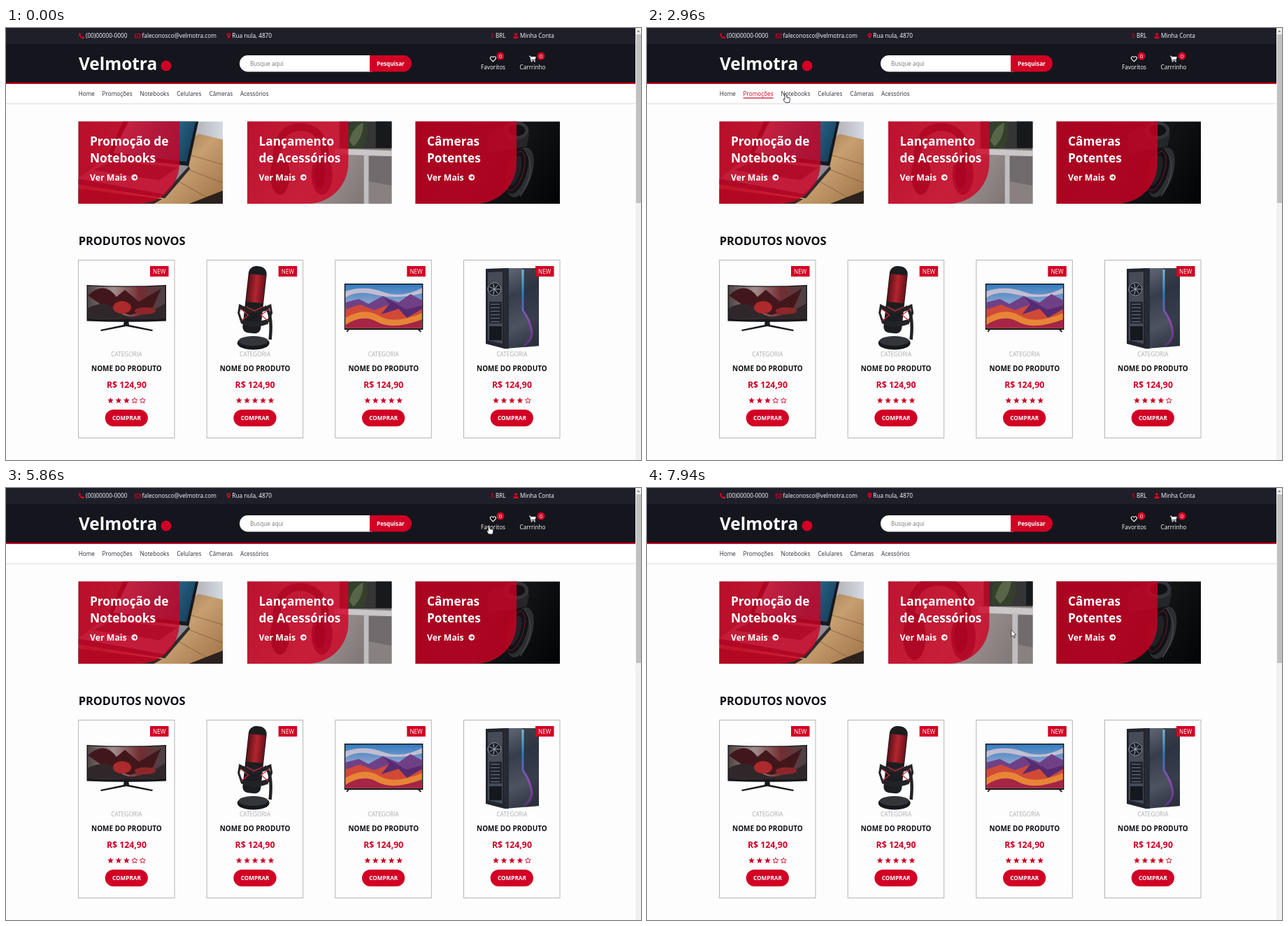
Recreate the animation shown at these times as an HTML page with a canvas. Size 908 by 617 pixels, loop 8000 ms.

```html
<!DOCTYPE html>
<html lang="pt-BR">
<head>
<meta charset="utf-8">
<title>Velmotra</title>
<style>
  html, body { margin: 0; width: 100%; height: 100%; overflow: hidden; background: #fff; }
  canvas { display: block; width: 908px; height: 617px; }
</style>
</head>
<body>
<canvas id="stage" width="908" height="617"></canvas>
<script>
const LOOP = 8000;
const RED = '#d10024', INK = '#2b2d3a';
const ctx = document.getElementById('stage').getContext('2d');

// ---------- timing helpers ----------
const clamp = v => Math.max(0, Math.min(1, v));
const ease = v => { v = clamp(v); return v * v * (3 - 2 * v); };
const hover = (t, [start, end], ms) => ease((t - start) / ms) * (1 - ease((t - end) / ms));

function mix(a, b, k) {
  return `rgb(${a.map((v, i) => Math.round(v + (b[i] - v) * k)).join()})`;
}

// ---------- drawing helpers ----------
function box(x, y, w, h, fill) {
  ctx.fillStyle = fill;
  ctx.fillRect(x, y, w, h);
}

function pill(x, y, w, h, r, fill) {
  ctx.beginPath();
  ctx.roundRect(x, y, w, h, r);
  ctx.fillStyle = fill;
  ctx.fill();
}

function disc(x, y, r, fill) {
  ctx.beginPath();
  ctx.arc(x, y, r, 0, 7);
  ctx.fillStyle = fill;
  ctx.fill();
}

function oval(x, y, rx, ry, fill) {
  ctx.beginPath();
  ctx.ellipse(x, y, rx, ry, 0, 0, 7);
  ctx.fillStyle = fill;
  ctx.fill();
}

function shape(d, fill, stroke, width = 1) {
  const p = new Path2D(d);
  if (fill) { ctx.fillStyle = fill; ctx.fill(p); }
  if (stroke) { ctx.strokeStyle = stroke; ctx.lineWidth = width; ctx.stroke(p); }
}

function at(x, y, s, draw) {
  ctx.save();
  ctx.translate(x, y);
  ctx.scale(s, s);
  draw();
  ctx.restore();
}

function text(str, x, y, size, fill, weight = 400, align = 'left') {
  ctx.font = `${weight} ${size}px "Open Sans", "Noto Sans", sans-serif`;
  ctx.textAlign = align;
  ctx.fillStyle = fill;
  ctx.fillText(str, x, y);
}

function fade(x0, y0, x1, y1, ...colors) {
  const g = ctx.createLinearGradient(x0, y0, x1, y1);
  colors.forEach((c, i) => g.addColorStop(i / (colors.length - 1), c));
  return g;
}

// ---------- header ----------
function topBar() {
  box(0, 0, 900, 23, '#1e1f29');
  at(104, 7.2, .8, () => shape('M1 0H3L4 3 3 4Q4 6 6 7L7 6 10 7V9Q9 10 8 10Q0 9 0 1Z', RED));
  text('(00)00000-0000', 114, 14, 8.25, '#fff');
  shape('M184.5 8.5H192.2V14H184.5ZM184.5 9.8L188.3 12.2 192.2 9.8', null, RED);
  text('faleconosco@velmotra.com', 194.5, 14, 8.25, '#fff');
  at(315.5, 7, .82, () => shape('M3.5 0Q7 0 7 3.5Q7 6 3.5 10Q0 6 0 3.5Q0 0 3.5 0Z', RED));
  disc(318.4, 9.8, 1.1, '#1e1f29');
  text('Rua nula, 4870', 323.3, 14, 8.25, '#fff');
  text('$', 693, 14.2, 8.8, RED);
  text('BRL', 700, 14, 8.2, '#fff');
  disc(729, 9, 2.1, RED);
  shape('M725.5 15V13.4Q725.8 11.6 727.5 11.6H730.5Q732.3 11.6 732.5 13.4V15Z', RED);
  text('Minha Conta', 735, 14, 8.2, '#fff');
}

function action(label, x, k) {
  text(label, x, 59, 8.2, mix([255, 255, 255], [209, 0, 36], k), 400, 'center');
}

function badge(x) {
  disc(x, 40, 5.5, RED);
  text('0', x, 42.9, 8, '#fff', 400, 'center');
}

function header(t) {
  box(0, 23, 900, 55, '#15161d');
  box(0, 78, 900, 2, RED);
  text('Velmotra', 104, 60, 24.4, '#fff', 700);
  disc(229, 54, 7.5, RED);

  pill(334, 39, 190, 23.5, [11.7, 0, 0, 11.7], '#fff');
  pill(520, 39, 60, 23.5, [0, 11.7, 11.7, 0], RED);
  text('Busque aqui', 349, 54, 8.2, '#757575');
  text('Pesquisar', 530, 54, 8.2, '#fff', 700);

  at(692, 40, .88, () => shape('M5 9 1 5C-1 2 3-1 5 2C7-1 11 2 9 5Z', null, '#fff', 1.2));
  at(748, 39.8, .97, () => {
    shape('M0 0H2L2.4 1.3H10L9 5.4H3.2L3.4 6.2H9V7.1H2.6L1.3 1H0Z', '#fff');
    disc(3.7, 8.3, .9, '#fff');
    disc(8.2, 8.3, .9, '#fff');
  });
  badge(707);
  badge(765);
  action('Favoritos', 696.5, hover(t, [5790, 6230], 500));
  action('Carrrinho', 753, hover(t, [6260, 6800], 500));
}

const NAV = [
  ['Home', 103.7, 1260, 1970],
  ['Promoções', 137.6, 2040, 2950],
  ['Notebooks', 191.6, 2950, 3640],
  ['Celulares', 244.2, 3640, 4330],
  ['Câmeras', 290.6, 4330, 4790],
  ['Acessórios', 335, 4790, 5380]
];

function nav(t) {
  box(0, 80, 900, 28, '#fff');
  box(0, 107.5, 900, 1, '#d9dade');
  for (const [label, x, start, end] of NAV) {
    const k = hover(t, [start, end], 420);
    text(label, x, 97, 8.2, mix([43, 45, 58], [209, 0, 36], k));
    const line = hover(t, [start, end + 30], 220);
    box(x, 99.4, ctx.measureText(label).width * line, 1.2, RED);
  }
}

// ---------- banner photos, 207 x 118 ----------
function laptopPhoto() {
  box(0, 0, 207, 118, fade(0, 0, 207, 0, '#5a4b48', '#7d7474', '#d5dae2'));
  shape('M0 84L150 34 172 18 207 26V118H0Z', fade(100, 30, 190, 118, '#8d6a48', '#c79f70', '#a5794c'));
  shape('M160 48L207 62M150 66L207 88M140 84L190 112', null, 'rgba(98,62,34,.5)', 1);
  shape('M158 118L207 99V118Z', '#2b211d');
  shape('M64 0H172L158 64 42 50Z', '#17191f');
  shape('M72 0H168L155 58 50 45Z', fade(60, 0, 165, 50, '#a9b6bd', '#2c7197', '#153d58'));
  shape('M42 50L158 64 122 104 0 82Z', '#8e8d94');
  shape('M48 56L142 66 116 84 22 70Z', '#3b3a42');
  shape('M0 82L122 104 158 64 160 68 124 110 0 90Z', '#2d2a30');
  shape('M0 96L120 111 108 118H0Z', '#3a2722');
}

function accessoryPhoto() {
  box(0, 0, 207, 118, fade(0, 0, 207, 118, '#655e60', '#a09694', '#70696a'));
  box(132, 0, 75, 39, '#353536');
  box(184, 0, 23, 38, '#18191b');
  shape('M143 38Q138 14 150 0H170Q176 16 166 38Z', '#34402b');
  shape('M146 28Q151 8 166 2Q166 24 152 36Z', '#596548');
  shape('M125 39L207 42V50L125 47Z', '#c9c7c8');
  shape('M167 48H174V118H167Z', '#c0bdbe');
  shape('M174 50H207V92L174 86Z', '#716b6d');
  shape('M174 86L207 92V118H174Z', '#898081');
  shape('M44 76Q34 10 76 8Q120 10 110 76', null, '#302b2e', 11);
  oval(47, 76, 14, 29, '#29262a');
  oval(107, 76, 15, 29, '#38323a');
  oval(104, 76, 8, 20, '#151519');
}

function cameraPhoto() {
  box(0, 0, 207, 118, fade(0, 0, 207, 118, '#141416', '#16181a', '#020304'));
  shape('M103 18Q140-10 163 19L159 36 103 46Z', '#252629');
  oval(144, 13, 18, 13, '#34353a');
  oval(145, 13, 12, 8, '#101114');
  ctx.save();
  ctx.translate(150, 73);
  ctx.rotate(.3);
  oval(0, 0, 17, 37, '#2d2e31');
  oval(-4, 0, 13, 33, '#111215');
  ctx.strokeStyle = '#8b1528';
  ctx.lineWidth = .8;
  ctx.beginPath();
  ctx.ellipse(-7, 0, 11, 29, 0, 0, 7);
  ctx.stroke();
  oval(-8, 0, 8, 22, '#202126');
  ctx.restore();
  shape('M156 40Q176 68 150 107', null, '#484a4e', 1.2);
}

const BANNERS = [
  { x: 103.5, lines: ['Promoção de', 'Notebooks'], photo: laptopPhoto, over: [820, 1110] },
  { x: 345, lines: ['Lançamento', 'de Acessórios'], photo: accessoryPhoto, over: [7630, 9000] },
  { x: 585.5, lines: ['Câmeras', 'Potentes'], photo: cameraPhoto, over: [6890, 7640] }
];

function banner({ x, lines, photo, over }, t) {
  const zoom = 1 + .2 * hover(t, over, 420);
  ctx.save();
  ctx.beginPath();
  ctx.rect(x, 133.5, 206.5, 117.5);
  ctx.clip();
  ctx.translate(x + 103.25, 192.25);
  ctx.scale(zoom, zoom);
  ctx.translate(-103.5, -59);
  photo();
  ctx.restore();
  pill(x, 133.5, 144.5, 117.5, [0, 0, 58, 0], 'rgba(209,0,36,.8)');
  text(lines[0], x + 16.5, 168, 17.3, '#fff', 700);
  text(lines[1], x + 16.5, 191.7, 17.3, '#fff', 700);
  text('Ver Mais', x + 16.5, 218, 12.3, '#fff', 700);
  at(x + 80.3, 213.4, 1, () => {
    disc(0, 0, 4.3, '#fff');
    shape('M-2.4 0H2M.1-2.1L2.2 0 .1 2.1', null, '#b90521', 1.2);
  });
}

// ---------- products, drawn on the first card's coordinates ----------
function monitor() {
  shape('M169 417H175L176 424 210 431 209 433 172 426 136 433 135 431 168 424Z', '#191a1d');
  shape('M115.5 367Q172 370 229 367V418.5Q172 421 115.5 418.5Z', '#16171a');
  ctx.save();
  ctx.clip(new Path2D('M117 368.5Q172 371 227.5 368.5V415Q172 417 117 415Z'));
  box(116, 367, 113, 51, fade(116, 0, 229, 0, '#4c4345', '#a28e8d', '#722d31', '#494448'));
  shape('M117 382Q140 360 158 384L170 374 190 391 222 372 210 399 178 410 146 402Z', '#42171b');
  shape('M117 400Q145 386 162 405T228 393V418H117Z', '#30272b');
  oval(166, 399, 13, 9, '#ac2a2b');
  oval(199, 404, 15, 5, '#8e2629');
  ctx.restore();
}

function microphone() {
  shape('M186 398Q198 405 194 445', null, '#202124', 4.5);
  oval(170, 450, 23, 9.5, '#17181b');
  oval(170, 447, 21, 7, '#34353a');
  ctx.save();
  ctx.translate(172, 388);
  ctx.rotate(.11);
  pill(-13, -48, 26, 96, [11, 11, 8, 8], '#1c1d20');
  box(-12, -36, 24, 40, fade(-12, 0, 12, 0, '#64131b', '#c52a34', '#70151f'));
  ctx.strokeStyle = 'rgba(55,5,12,.4)';
  ctx.lineWidth = .6;
  for (let y = -35; y < 4; y += 2) {
    ctx.beginPath();
    ctx.moveTo(-12, y);
    ctx.lineTo(12, y);
    ctx.stroke();
  }
  ctx.restore();
  shape('M149 394Q171 406 196 394L192 402Q170 412 151 402ZM150 414Q171 424 195 414L190 423Q169 431 153 422Z', '#222327');
  shape('M151 395L149 407 154 422M194 395L196 407 189 423', null, '#222327', 3);
  shape('M152 401L163 410 153 418M193 401L181 410 191 418M160 398L171 404 184 398', null, '#d42a35', 1.2);
}

function television() {
  shape('M123 430L120 434M222 430L226 434', null, '#26272b', 2);
  box(116.5, 365, 112.5, 66, '#17181b');
  ctx.save();
  ctx.beginPath();
  ctx.rect(118, 366.5, 109.5, 62);
  ctx.clip();
  box(117, 366, 111, 64, fade(0, 366, 0, 430, '#347cc0', '#98aacd', '#bb7184'));
  shape('M118 376Q145 367 172 377T228 371V379Q190 388 162 381T118 385Z', 'rgba(239,210,216,.7)');
  shape('M118 392L137 387 151 394 171 383 194 392 211 380 228 389V430H118Z', '#704087');
  shape('M118 402L139 395 159 403 183 394 205 402 228 396V430H118Z', '#d14937');
  shape('M118 414Q145 398 166 411T228 407V430H118Z', '#e78537');
  shape('M118 424Q143 408 164 420T228 416V430H118Z', '#a52546');
  shape('M171 383L181 394 169 409 194 401 206 414 228 401V396L205 402Z', '#562b72');
  ctx.restore();
}

function tower() {
  shape('M135 344L162 343V458L135 451Z', '#22252e');
  shape('M138 349L159 348V451L138 446Z', '#454c58');
  disc(147.5, 373, 10.5, '#1c2028');
  ctx.strokeStyle = '#a6b0bb';
  ctx.lineWidth = 1;
  ctx.beginPath();
  ctx.arc(147.5, 373, 9.5, 0, 7);
  ctx.stroke();
  for (let i = 0; i < 7; i++) {
    const a = i * Math.PI * 2 / 7;
    ctx.beginPath();
    ctx.moveTo(147.5, 373);
    ctx.lineTo(147.5 + 8 * Math.cos(a), 373 + 8 * Math.sin(a));
    ctx.stroke();
  }
  box(140, 391, 18, 31, '#20242d');
  for (let y = 394; y < 422; y += 5) box(142, y, 13, 1, '#69727e');
  box(140, 426, 18, 20, '#15181f');
  shape('M161 343H211V454L162 458Z', fade(161, 343, 211, 458, '#626a78', '#363d4b', '#4c5361', '#282d39'));
  shape('M161 343H168V458H162Z', '#252a35');
  shape('M187 345V402Q199 419 201 435Q202 449 190 456L211 454V343H187Z', 'rgba(39,45,58,.55)');
  shape('M188 345V403Q200 420 201 436Q200 447 190 453', null, fade(0, 345, 0, 454, '#79bed5', '#267cbd', '#9547b0', '#57337f'), 3);
}

function star(x, y, full) {
  ctx.beginPath();
  for (let i = 0; i < 10; i++) {
    const r = i % 2 ? 2 : (full ? 4.7 : 4.1);
    const a = i * Math.PI / 5 - Math.PI / 2;
    ctx.lineTo(x + r * Math.cos(a), y + r * Math.sin(a));
  }
  ctx.closePath();
  ctx.fillStyle = ctx.strokeStyle = RED;
  ctx.lineWidth = .9;
  if (full) ctx.fill(); else ctx.stroke();
}

const PRODUCTS = [[monitor, 3], [microphone, 5], [television, 5], [tower, 4]];

function product([picture, rating], i) {
  ctx.save();
  ctx.translate(i * 183.67, 0);
  ctx.strokeStyle = '#b5b5b5';
  ctx.lineWidth = 1;
  ctx.strokeRect(103.5, 331.5, 137.5, 254);
  picture();
  box(206, 340, 26.5, 15, RED);
  text('NEW', 219.2, 350.6, 8.2, '#fff', 400, 'center');
  text('CATEGORIA', 172.4, 469, 8.25, '#a9abb0', 400, 'center');
  text('NOME DO PRODUTO', 172.4, 489.7, 9.97, '#0d0e12', 700, 'center');
  text('R$ 124,90', 172.4, 514, 12.3, RED, 700, 'center');
  for (let s = 0; s < 5; s++) star(149.5 + s * 11.45, 532.2, s < rating);
  pill(141.7, 545, 61.2, 24, 12, RED);
  text('COMPRAR', 172.4, 560, 8.2, '#fff', 700, 'center');
  ctx.restore();
}

function scrollbar() {
  box(900, 0, 8, 617, '#f1f1f1');
  shape('M902 6L904.3 3 906.6 6Z', '#8a8a8a');
  box(901, 9, 7, 241, '#c1c1c1');
}

// ---------- pointer: time, x, y ----------
const PATH = [
  [180, 745, 555], [500, 590, 430], [820, 278, 238], [930, 240, 192], [990, 240, 192],
  [1130, 186, 130], [1260, 132, 97], [1500, 122.5, 91.5], [1930, 122.5, 91.5],
  [2040, 140, 94], [2230, 180, 95], [2370, 180, 95], [2800, 188, 94], [2960, 198, 93.5],
  [3110, 213, 94], [3180, 213, 94], [3640, 243, 94], [3950, 268, 93], [4020, 268, 93],
  [4330, 290, 91], [4750, 316.5, 90.5], [4820, 342, 91], [4910, 342, 91],
  [5240, 368, 91], [5400, 405, 84], [5700, 694, 56], [5770, 694, 56], [5860, 690.5, 53],
  [6100, 702, 53], [6260, 736, 54], [6510, 752, 54], [6580, 752, 54], [6800, 744, 64],
  [6890, 728, 134], [7080, 694, 188], [7380, 718, 193], [7440, 718, 193],
  [7660, 546, 205], [7940, 521, 202.5], [8000, 521, 202.5]
];

function pointer(t) {
  if (t < 180 || (t >= 7440 && t < 7660)) return;
  const i = Math.max(1, PATH.findIndex(p => p[0] > t));
  const [t0, x0, y0] = PATH[i - 1], [t1, x1, y1] = PATH[i];
  const k = (t - t0) / (t1 - t0);
  const hand = (t > 1260 && t < 5380) || (t > 5690 && t < 6800);
  at(x0 + (x1 - x0) * k, y0 + (y1 - y0) * k, 1, () => {
    ctx.lineJoin = 'round';
    if (hand) {
      shape('M-1.2 1Q0-.6 1.2 1V5L5.2 5.8Q6.5 6.2 6.3 8L5.4 13H-.3L-2.9 9.2Q-3.4 7.6-2.1 7.7L-1.2 8.7Z', '#fff', '#15161d', .8);
      shape('M2.7 5.5V7M4.2 5.8V7.2', null, '#15161d', .5);
    } else {
      shape('M0 0V10L2.3 7.9 3.9 11.6 5.4 11 3.9 7.4H7Z', '#fff', '#111', .7);
    }
    ctx.lineJoin = 'miter';
  });
}

function draw(now) {
  const t = now % LOOP;
  box(0, 0, 908, 617, '#fdfdfd');
  topBar();
  header(t);
  nav(t);
  BANNERS.forEach(b => banner(b, t));
  text('PRODUTOS NOVOS', 103.7, 310, 16.4, '#0d0e12', 700);
  PRODUCTS.forEach(product);
  scrollbar();
  pointer(t);
  requestAnimationFrame(draw);
}
requestAnimationFrame(draw);
</script>
</body>
</html>
```
